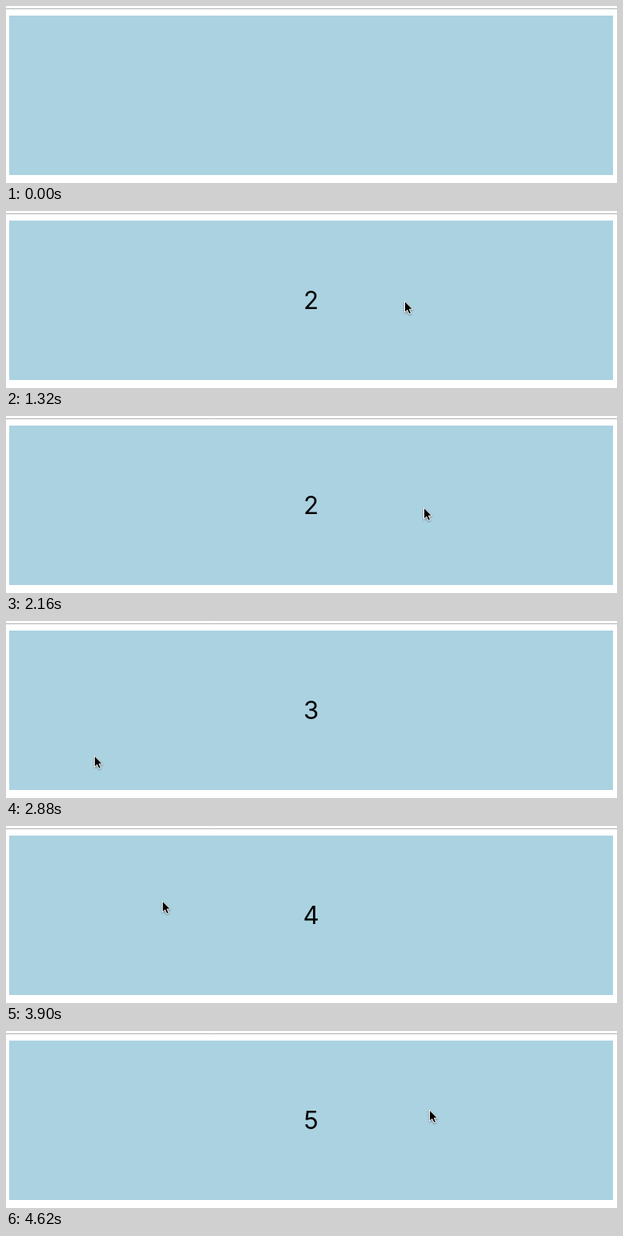
These frames come from a looping animation (764x222 px, 5100 ms). An HTML page:

```html
<!DOCTYPE html>
<html>
<head>
<meta charset="utf-8">
<style>
  html, body { margin: 0; height: 100%; overflow: hidden; background: #fff; }
  svg { display: block; }
  text { font: 31px Inter, sans-serif; text-anchor: middle; }
  #cursor { filter: drop-shadow(0 1px 1px #0006); }
</style>
</head>
<body>
<svg width="764" height="222">
  <path d="M0 3.5H764" stroke="#adb0b0"/>
  <rect x="4" y="12" width="755" height="200" fill="#abd2e1"/>
  <text id="count" x="381.5" y="123"></text>
  <path id="cursor" d="M.5 1V15.2L3.8 12.2 6 17.2 8.6 16.1 6.4 11.2H10.6Z" stroke="#fff"/>
</svg>
<script>
const LOOP = 5100, STEP = 60, SWING = 170;
const count = document.getElementById('count');
const cursor = document.getElementById('cursor');

// Where the mouse goes; a swing adds one extra sweep right and left on the way there
const stops = [
  { t: 60, x: 690, y: 60 },
  { t: 600, x: 250, y: 118, swing: SWING },
  { t: 1320, x: 498, y: 112, swing: SWING },
  { t: 1800, x: 218, y: 118 },
  { t: 2160, x: 522, y: 114 },
  { t: 2400, x: 110, y: 168 },
  { t: 3120, x: 110, y: 168 },
  { t: 3660, x: 645, y: 88 },
  { t: 3900, x: 195, y: 93 },
  { t: 4620, x: 529, y: 98, swing: SWING }
];

const clamp = (v, min, max) => Math.min(max, Math.max(min, v));

function position(t) {
  const next = stops.findIndex(s => s.t >= t);
  const b = stops.at(next), a = stops[Math.max(0, stops.indexOf(b) - 1)];
  const u = clamp((t - a.t) / (b.t - a.t || 1), 0, 1);
  const k = u * u * (3 - 2 * u);
  const sweep = (b.swing || 0) * Math.sin(2 * Math.PI * u);
  return [a.x + (b.x - a.x) * k + sweep, a.y + (b.y - a.y) * k].map(Math.round);
}

// One count per 900 ms, held back for 600 ms while the mouse rests
function counter(t) {
  const active = t - clamp(t - 2100, 0, 600);
  return Math.floor((active + 540) / 900);
}

function draw() {
  const t = Math.floor(performance.now() % LOOP / STEP) * STEP;
  count.textContent = counter(t) || '';
  cursor.style.display = t < stops[0].t ? 'none' : '';
  cursor.setAttribute('transform', `translate(${position(t)})`);
  requestAnimationFrame(draw);
}
draw();
</script>
</body>
</html>
```
